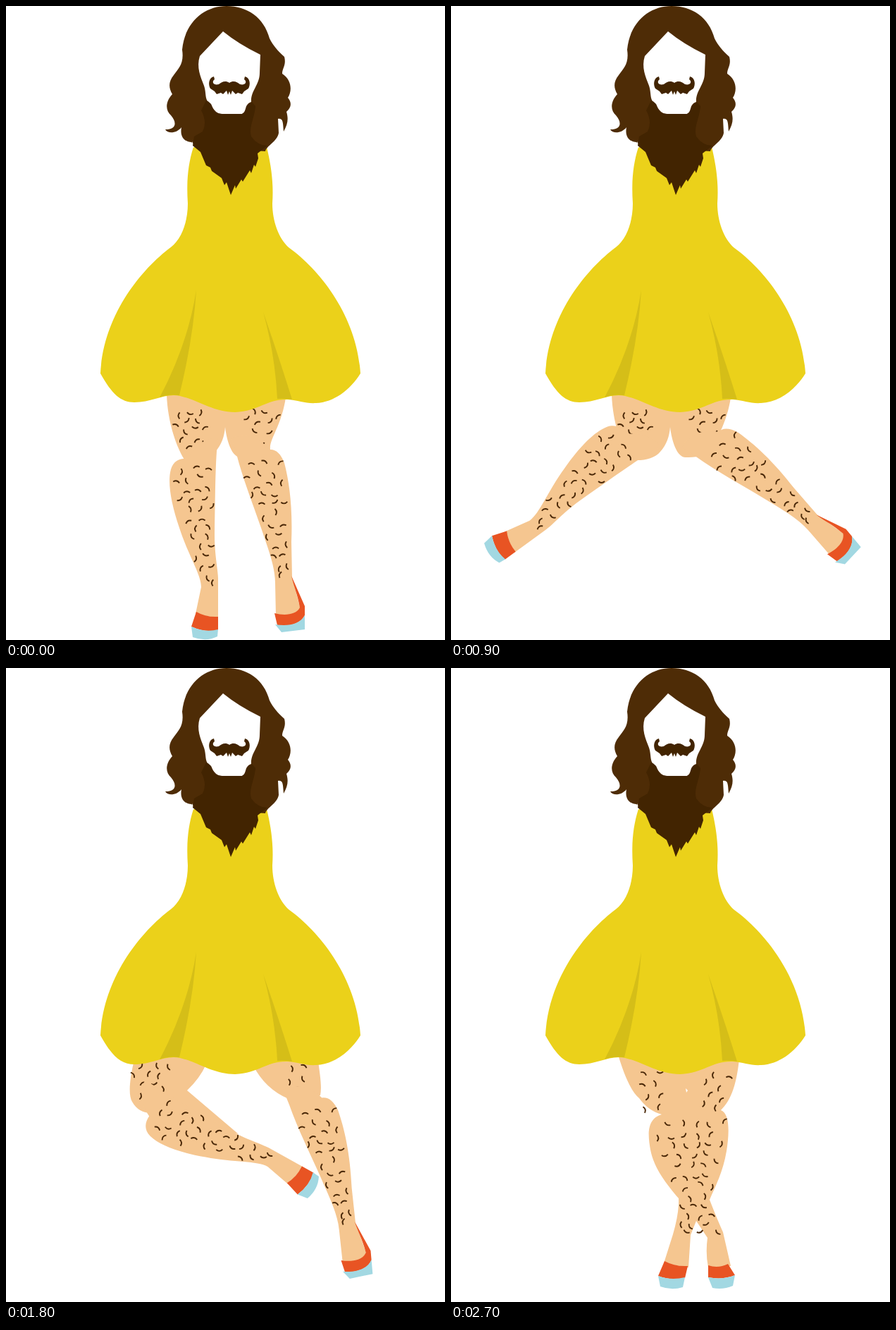
Recreate the animation shown at these times as an HTML page. Size 623 by 899 pixels, loop 3200 ms.

```html
<!DOCTYPE html>
<html lang="en">
<head>
<meta charset="utf-8">
<title>Dancing legs</title>
<style>
  html, body { margin: 0; width: 100%; height: 100%; overflow: hidden; background: #fff; }
  svg { display: block; width: 100%; height: 100%; }
  .skin { fill: #f5c690; }
  .red { fill: #e85423; }
  .blue { fill: #a2d8e2; }
  .dress { fill: #ebd11a; }
  .fold { fill: #d5be18; }
  .locks { fill: #4e2c06; }
  .beard { fill: #422401; }
  .face { fill: #fff; }
  .hair { fill: none; stroke: #492707; stroke-width: 1.9; }
</style>
</head>
<body>
<svg viewBox="0 0 623 899">
  <g id="thighsDown">
    <path class="skin" d="M228 540C227 580 239 620 253 643C268 646 288 643 297 632C306 622 310 610 311 597C313 615 320 640 333 640C350 641 365 635 375 629C373 612 394 595 399 540Z"/>
  </g>
  <g id="thighsOut">
    <path class="skin" d="M186 540C175 580 173 605 179 615Q188 631 206 631L330 661L257 599Q275 582 284 562V540Z"/>
    <path class="skin" d="M351 540V564Q368 597 401 611L446 606C449 590 444 570 441 540Z"/>
  </g>
  <g id="shinL">
    <path class="skin" d="M301 612C297 640 297 690 296 750C296 780 301 800 301 812V868L269 862L277 824C277 806 259 780 246 740C234 705 229 675 234 657C238 644 248 641 258 642C265 628 280 612 301 612Z"/>
    <path class="red" d="M270 859Q284 867 301 866V885Q283 889 263 880Z"/>
    <path class="blue" d="M263 880Q283 889 301 884L300 894Q284 902 265 895Z"/>
  </g>
  <g id="shinR">
    <path class="skin" d="M320 612L327 635C336 670 350 705 362 740C372 770 382 795 382 818L383 866L417 862V852L406 810L405 760C407 710 402 675 395 648C390 634 382 628 374 629C360 612 345 606 320 612Z"/>
    <path class="red" d="M405 808L424 851V864C417 878 398 880 385 878L381 861C396 865 412 863 417 853C414 835 409 825 405 808Z"/>
    <path class="blue" d="M382 877C400 880 417 877 424 864V884L391 888Z"/>
  </g>
  <g id="folded">
    <path class="skin" d="M284 562C270 590 250 617 230 623L211 633L196 621L193 615L88 512L62 497L22 453L48 437Q60 455 66 470Q95 485 137 496L200 540Z"/>
    <path class="skin" d="M351 562Q366 592 388 606Q385 618 397 625L425 637L470 562L505 498Q520 462 545 440L556 432L532 412Q520 435 510 443L494 465L486 500L440 545Z"/>
    <path class="blue" d="M7 418L12 414L32 423L20 433Q12 432 7 418ZM553 402L567 389L574 395L570 411Z"/>
    <path class="red" d="M25 422H40L51 441C47 458 32 462 25 459L12 447Q16 430 25 422ZM541 399Q552 398 562 405L571 410V422L557 436C545 437 530 428 531 416Z"/>
  </g>
  <g id="crossed">
    <path class="skin" d="M236 545C245 575 255 600 267 610Q280 628 299 633C276 640 280 665 283 683C288 710 307 733 323 752Q324 772 315 803L302 844L337 850Q339 820 340 804L348 784L364 808Q361 830 365 850L397 848L386 800Q377 780 367 754C375 735 386 715 391 685C395 660 396 632 383 627C398 612 406 590 410 545Z"/>
    <path class="face" d="M333 596L336 599L334 602Z"/>
    <path class="red" d="M303 841Q318 849 336 848L332 865Q312 869 294 862ZM365 847Q379 852 393 845L403 861Q385 868 365 864Z"/>
    <path class="blue" d="M294 862Q312 869 332 864L329 878Q313 883 297 877ZM365 864Q385 868 403 861L400 876Q386 882 371 879Z"/>
  </g>

  <path class="dress" d="M266 200C258 225 256 250 258 280C258 305 250 330 234 342C190 375 138 440 134 521C150 550 163 562 182 562C205 562 220 552 238 552C265 553 290 576 325 576C360 574 370 557 400 558C415 559 425 564 440 563C465 562 488 545 503 521C498 440 446 375 402 343C387 330 378 305 378 280C380 250 376 225 370 200Z"/>
  <path class="fold" d="M270 403Q266 470 246 552Q230 550 218 555Q258 480 270 403ZM365 434Q388 500 406 558Q395 556 385 557Q382 495 365 434Z"/>

  <path class="locks" d="M313 0C282 0 254 22 250 62C253 82 245 88 238 98C230 108 231 116 236 125C226 136 226 148 234 155C242 164 243 175 226 175C230 182 243 180 249 172C246 188 256 193 263 193L270 200L368 206C370 198 385 192 387 180L386 160C394 158 393 168 394 178C400 167 401 160 398 150C406 143 405 136 400 130C406 121 406 105 392 96C392 88 398 84 395 72C386 64 379 56 374 46C366 16 342 0 313 0Z"/>
  <path class="face" d="M264 192L268 200L264 201Z"/>
  <path class="face" d="M308 36L275 71C270 87 276 100 281 113C285 125 281 134 291 139C295 149 300 153 307 153H335C342 150 338 139 348 136C347 120 360 112 360 95L361 69Q330 54 308 36Z"/>
  <path class="beard" d="M284 134Q291 136 293 145Q297 153 306 153H335Q341 150 341 142L349 136L354 142C353 158 344 172 348 185Q357 198 371 198L357 209L358 216L354 228L352 225L348 237L346 233L336 249L334 246L326 259L325 254L319 268L313 250L310 254L306 244L292 234L290 229L284 226L276 207L265 198L267 185L279 178Q286 165 277 148Z"/>
  <g class="beard">
    <path id="half" d="M317 109C311 105 306 108 302 111C295 113 291 108 296 104L295 100C287 102 287 112 290 117L296 121L299 125L305 123L308 125L313 120L315 126L317 121Z"/>
    <use href="#half" transform="matrix(-1 0 0 1 634 0)"/>
  </g>
</svg>
<script>
const $ = id => document.getElementById(id);
const lerp = (a, b, k) => a + (b - a) * k;

let seed = 7;
function random() {
  seed = (seed * 16807) % 2147483647;
  return seed / 2147483647;
}
const jitter = size => (random() - 0.5) * size;

function addHair(group, x, y) {
  const p = document.createElementNS("http://www.w3.org/2000/svg", "path");
  p.setAttribute("class", "hair");
  p.setAttribute("d", "M-4.5 1Q0 -3 4.5 1");
  p.setAttribute("transform", `translate(${x} ${y}) rotate(${random() * 360})`);
  group.append(p);
}

// Staggered rows of hairs along a limb whose width runs from w0 to w1.
function growHair(id, [x0, y0], [x1, y1], w0, w1) {
  const length = Math.hypot(x1 - x0, y1 - y0);
  const nx = (y0 - y1) / length, ny = (x1 - x0) / length;
  const rows = Math.round(length / 14);
  for (let row = 0; row <= rows; row++) {
    const k = row / rows, width = lerp(w0, w1, k);
    const count = Math.max(1, Math.round(width / 18));
    for (let i = 0; i < count; i++) {
      const side = ((i + 0.5) / count - 0.5 + (row % 2 - 0.5) * 0.2) * width;
      addHair($(id), lerp(x0, x1, k) + nx * side + jitter(6), lerp(y0, y1, k) + ny * side + jitter(8));
    }
  }
}

growHair("thighsDown", [258, 577], [266, 626], 50, 40);
growHair("thighsDown", [364, 577], [358, 617], 50, 42);
growHair("thighsOut", [206, 565], [204, 606], 56, 44);
growHair("thighsOut", [414, 567], [416, 600], 34, 30);
growHair("shinL", [262, 657], [288, 822], 58, 22);
growHair("shinR", [364, 650], [393, 808], 58, 24);
growHair("folded", [222, 590], [70, 480], 44, 26);
growHair("folded", [406, 608], [450, 568], 38, 36);
growHair("folded", [503, 484], [526, 450], 26, 24);
growHair("crossed", [282, 577], [290, 620], 42, 36);
growHair("crossed", [380, 577], [368, 620], 42, 36);
growHair("crossed", [338, 648], [346, 735], 98, 56);
growHair("crossed", [345, 750], [349, 802], 40, 62);

// Each shin is placed as [knee x, knee y, turn].
const kneeL = [279, 621], kneeR = [345.6, 617];
const pose = (thighs, l, r) => ({ thighs, l, r });
const between = (a, b) => pose(a.thighs,
  a.l.map((v, i) => lerp(v, b.l[i], 0.5)),
  a.r.map((v, i) => lerp(v, b.r[i], 0.5)));

const stand = pose("thighsDown", [...kneeL, 0], [...kneeR, 0]);
const half = pose("thighsDown", [277, 612, 54], [350, 613, -40]);
const split = pose("thighsDown", [279, 618, 86.3], [345, 616, -76]);
const kick = pose("thighsOut", [195, 607, -61], [419, 600, -5]);
const lotus = pose("thighsOut", kick.l, [424, 584, 62]);

const steps = [
  [0, stand], [100, between(stand, half)], [200, half], [300, between(half, split)],
  [400, split], [900, half], [1100, kick], [1300, lotus], [1800, kick], [2000, split],
  [2200, pose("folded")], [2700, pose("crossed")]
];

const show = (id, on) => { $(id).style.display = on ? "" : "none"; };

function place(id, knee, at) {
  show(id, at);
  if (!at) return;
  const [x, y, turn] = at;
  $(id).setAttribute("transform",
    `translate(${x} ${y}) rotate(${turn}) translate(${-knee[0]} ${-knee[1]})`);
}

function draw(p) {
  for (const id of ["thighsDown", "thighsOut", "folded", "crossed"]) show(id, id === p.thighs);
  place("shinL", kneeL, p.l);
  place("shinR", kneeR, p.r);
}

let current;
function tick() {
  const t = performance.now() % 3200;
  const next = steps.findLast(s => s[0] <= t)[1];
  if (next !== current) draw(current = next);
  requestAnimationFrame(tick);
}
tick();
</script>
</body>
</html>
```
